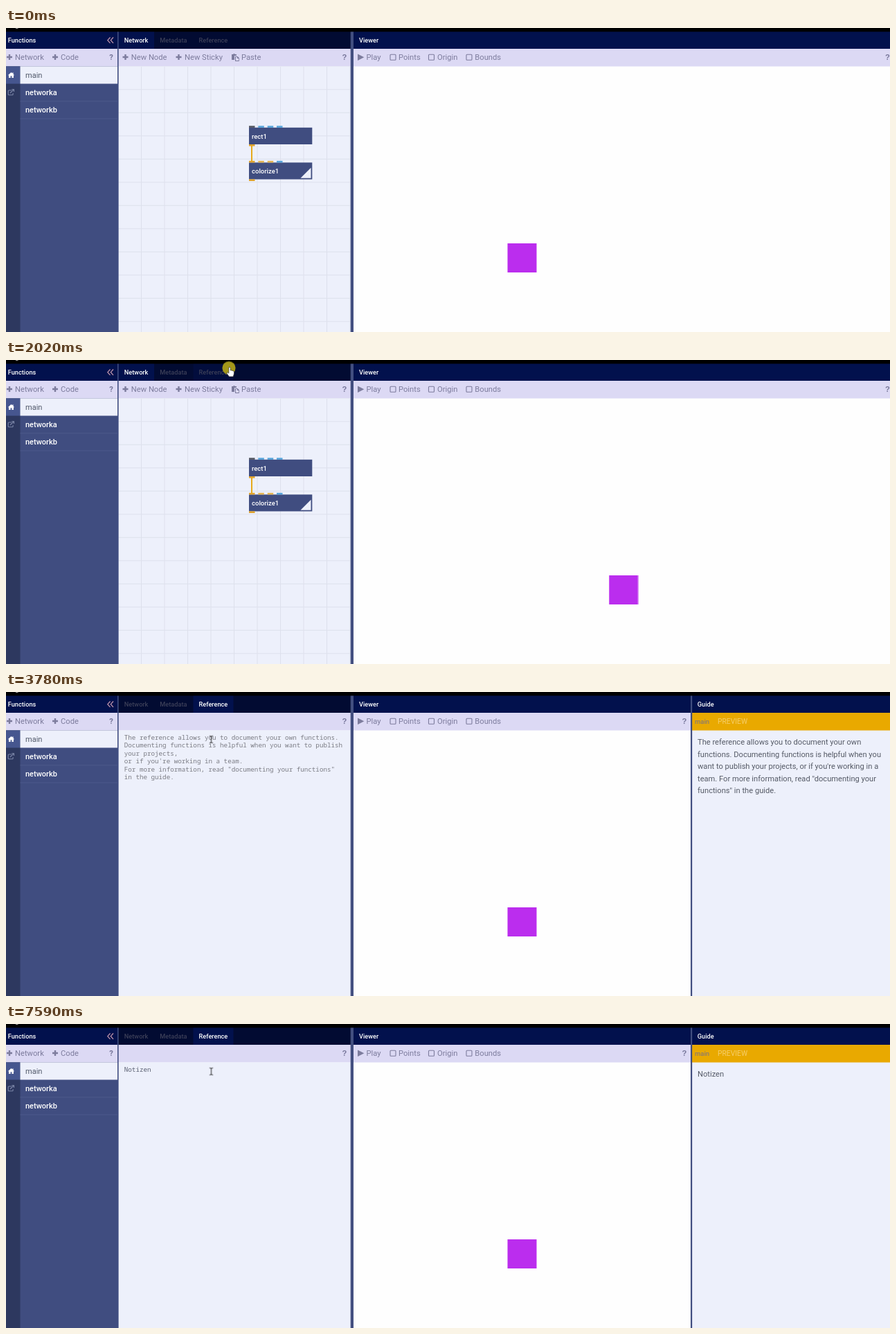
Recreate the animation shown at these times as an HTML page. Size 1277 by 439 pixels, loop 8 s.

```html
<!DOCTYPE html>
<html lang="en">
<head>
<meta charset="utf-8">
<title>Node editor</title>
<style>
  html, body { margin: 0; width: 100%; height: 100%; overflow: hidden; background: #fefefe; }
  svg { display: block; width: 100%; height: 100%; }
  text { white-space: pre; font-family: Roboto, "Noto Sans", sans-serif; }

  .title { font-size: 9.2px; font-weight: 500; fill: #fff; }
  .dim { fill: #3c3f58; }
  .tool { font: 11.2px "Liberation Sans", Arial, sans-serif; fill: #7d7c9d; }
  .help { font-weight: 700; fill: #77769a; text-anchor: middle; }
  .item { font-size: 11px; font-weight: 500; fill: #fff; }
  .node { font-size: 9.5px; font-weight: 500; fill: #fff; }
  .mono { font: 9.22px "Noto Sans Mono", "DejaVu Sans Mono", monospace; fill: #7b7c84; }
  .typed { fill: #5a6072; }
  .prose { font-size: 11.13px; fill: #555a66; }
  .icon { fill: #7d7c9d; }
  .box { fill: none; stroke: #7d7c9d; stroke-width: 1.1; }
  .bar { fill: #02114d; }
  .tools { fill: #dcd9f4; }
  .paper { fill: #edf0fb; }
  .slate { fill: #404d80; }
  .gold { fill: #e0a32c; }
  .tan { fill: #e4b552; }
  .blue { fill: #55a3da; }

  .net, .ref, .hint, .hover, .square, .click, .mouse, .arrow, .hand, .beam {
    animation: 8s step-end infinite;
  }
  .net { animation-name: net; }
  .ref { animation-name: ref; }
  .hint { animation-name: hint; }
  .hover { animation-name: hover; }
  .square { animation-name: square; }
  .click { animation-name: click; }
  .mouse { animation-name: mouse; }
  .arrow { animation-name: arrow; }
  .hand { animation-name: hand; }
  .beam { animation-name: beam; }

  @keyframes net { 0% { opacity: 1 } 26.25%, 100% { opacity: 0 } }
  @keyframes ref { 0% { opacity: 0 } 26.25%, 100% { opacity: 1 } }
  @keyframes hint { 0% { opacity: 1 } 53.25%, 100% { opacity: 0 } }
  @keyframes hover { 0% { opacity: 0 } 21.375%, 100% { opacity: 1 } }
  @keyframes square {
    0% { transform: none }
    25.25% { transform: translateX(146.5px) }
    40.625%, 100% { transform: none }
  }
  @keyframes click {
    0% { opacity: 0; transform: translate(322px, 11.5px) }
    24.125% { opacity: 1; transform: translate(322px, 11.5px) }
    26.25% { opacity: 0; transform: translate(296.5px, 68px) }
    39.625% { opacity: 1; transform: translate(296.5px, 68px) }
    41.5%, 100% { opacity: 0; transform: translate(296.5px, 68px) }
  }
  @keyframes mouse {
    0% { transform: translate(467px, 390px) }
    13.5% { transform: translate(457px, 334px) }
    14.5% { transform: translate(432px, 246px) }
    15.5% { transform: translate(402px, 150px) }
    16.375% { transform: translate(373px, 78px) }
    17.375% { transform: translate(352px, 34px) }
    18.375% { transform: translate(343px, 17px) }
    19.375% { transform: translate(338px, 14px) }
    20.375% { transform: translate(333px, 12px) }
    21.375% { transform: translate(326px, 11px) }
    22.25% { transform: translate(323px, 10px) }
    30% { transform: translate(311px, 38px) }
    31% { transform: translate(298px, 70px) }
    32% { transform: translate(293.5px, 85.5px) }
    35.875% { transform: translate(294px, 82px) }
    36.75% { transform: translate(295px, 77px) }
    37.75% { transform: translate(296px, 72px) }
    38.75%, 100% { transform: translate(296.5px, 68.5px) }
  }
  @keyframes arrow {
    0% { opacity: 0 } 12.5% { opacity: 1 } 21.375% { opacity: 0 }
    30% { opacity: 1 } 31%, 100% { opacity: 0 }
  }
  @keyframes hand { 0% { opacity: 0 } 21.375% { opacity: 1 } 30%, 100% { opacity: 0 } }
  @keyframes beam { 0% { opacity: 0 } 31%, 100% { opacity: 1 } }
</style>
</head>
<body>
<svg viewBox="0 0 1277 439" xmlns="http://www.w3.org/2000/svg">
  <defs>
    <path id="plus" d="M-4-1.2h2.8V-4h2.4v2.8H4v2.4H1.2V4h-2.4V1.2H-4z"/>
    <rect id="check" x="-4" y="-4" width="8" height="8" rx="1"/>
    <rect id="port" width="8.5" height="2.6"/>
    <pattern id="grid" x="195" y="88.3" width="33.5" height="33.5" patternUnits="userSpaceOnUse">
      <path d="M.5 0V33.5M0 .5H33.5" stroke="#dde0ec" fill="none"/>
    </pattern>
  </defs>

  <!-- Viewer -->
  <rect x="500" y="55" width="777" height="384" fill="#fefefe"/>
  <rect class="square" x="724.5" y="311" width="42" height="42" fill="#bb2dee"/>
  <rect class="bar" y="5" width="1277" height="25"/>
  <rect class="tools" y="30" width="1277" height="25.5"/>
  <text class="title" x="510" y="20.8">Viewer</text>
  <path class="icon" d="M508 37.5l9.3 4.7-9.3 4.7z"/>
  <g class="box">
    <use href="#check" x="559" y="42.2"/>
    <use href="#check" x="614.5" y="42.2"/>
    <use href="#check" x="669" y="42.2"/>
  </g>
  <g class="tool">
    <text x="520.5" y="46.3">Play</text>
    <text x="567" y="46.3">Points</text>
    <text x="623" y="46.3">Origin</text>
    <text x="677.3" y="46.3">Bounds</text>
  </g>

  <!-- Middle panel -->
  <rect class="paper" x="162" y="55.5" width="336" height="384"/>
  <rect x="162" y="5" width="336" height="25" fill="#020b32"/>
  <g class="net">
    <rect x="162" y="55.5" width="336" height="384" fill="url(#grid)"/>
    <rect class="bar" x="162" y="5" width="52" height="25"/>
    <g class="hover">
      <rect x="270.5" y="5" width="58" height="25" fill="#020d3d"/>
    </g>
    <text class="title" x="170.8" y="20.8">Network</text>
    <text class="title dim" x="222.3" y="20.8">Metadata</text>
    <text class="title dim" x="278.6" y="20.8">Reference</text>
    <g class="icon">
      <use href="#plus" x="172.5" y="42"/>
      <use href="#plus" x="249.5" y="42"/>
      <path d="M326 38h2q1.5-2 3 0h2v2h-3v6h-4zM331 41h3.5l2.3 2.3V48H331z"/>
    </g>
    <path d="M332 42h2v2h2v3h-4z" fill="#dcd9f4"/>
    <g class="tool">
      <text x="180.8" y="46.3">New Node</text>
      <text x="258" y="46.3">New Sticky</text>
      <text x="340" y="46.3">Paste</text>
    </g>

    <path d="M355 170V193" stroke="#e6a91b" stroke-width="2"/>
    <rect class="slate" x="351" y="143.8" width="91.3" height="24.2"/>
    <rect class="slate" x="351" y="194.3" width="91.3" height="24.2"/>
    <path d="M425.5 216.7H440.5V201.7z" fill="#eef1fb"/>
    <use href="#port" x="351" y="141.3" fill="#51545f"/>
    <g class="blue">
      <use href="#port" x="364.3" y="141.3"/>
      <use href="#port" x="377.7" y="141.3"/>
      <use href="#port" x="391" y="141.3"/>
      <use href="#port" x="391" y="191.8"/>
    </g>
    <g class="gold">
      <use href="#port" x="351" y="168"/>
      <use href="#port" x="351" y="191.8"/>
      <use href="#port" x="351" y="218.4"/>
    </g>
    <g class="tan">
      <use href="#port" x="364.3" y="191.8"/>
      <use href="#port" x="377.7" y="191.8"/>
    </g>
    <text class="node" x="355" y="159.8">rect1</text>
    <text class="node" x="355" y="210.2">colorize1</text>
    <text class="tool help" x="1273.5" y="46.3">?</text>
  </g>

  <!-- Reference and guide -->
  <g class="ref">
    <rect class="bar" x="270.5" y="5" width="58" height="25"/>
    <text class="title dim" x="170.8" y="20.8">Network</text>
    <text class="title dim" x="222.3" y="20.8">Metadata</text>
    <text class="title" x="278.6" y="20.8">Reference</text>
    <text class="tool help" x="980" y="46.3">?</text>
    <rect class="paper" x="990" y="55.5" width="287" height="384"/>
    <rect x="990" y="30" width="287" height="25.5" fill="#e9a900"/>
    <rect class="slate" x="989" y="5" width="2.2" height="434"/>
    <text class="title" x="998.8" y="20.8">Guide</text>
    <text class="title" x="995" y="45.6" style="fill:#8a7b72;font-size:9.5px">main</text>
    <text x="1028" y="46" font-size="10.3" fill="#f6cf6c">PREVIEW</text>
    <g class="hint">
      <text class="mono">
        <tspan x="170.8" y="69">The reference allows you to document your own functions.</tspan>
        <tspan x="170.8" y="80.4">Documenting functions is helpful when you want to publish</tspan>
        <tspan x="170.8" y="91.8">your projects,</tspan>
        <tspan x="170.8" y="103.2">or if you're working in a team.</tspan>
        <tspan x="170.8" y="114.6">For more information, read "documenting your functions"</tspan>
        <tspan x="170.8" y="126">in the guide.</tspan>
      </text>
      <text class="prose">
        <tspan x="999" y="76">The reference allows you to document your own</tspan>
        <tspan x="999" y="93.5">functions. Documenting functions is helpful when you</tspan>
        <tspan x="999" y="111">want to publish your projects, or if you're working in a</tspan>
        <tspan x="999" y="128.5">team. For more information, read "documenting your</tspan>
        <tspan x="999" y="146">functions" in the guide.</tspan>
      </text>
    </g>
    <text id="note" class="mono typed" x="170.8" y="69"></text>
    <text id="preview" class="prose" x="999" y="76"></text>
    <rect id="caret" width="1" height="11.5" fill="#3b4050"/>
  </g>
  <text class="tool help" x="489" y="46.3">?</text>

  <!-- Sidebar -->
  <rect class="slate" y="55.5" width="162" height="384"/>
  <rect y="55.5" width="20.5" height="384" fill="#2d385f"/>
  <rect y="55.5" width="20.5" height="25" fill="#46568f"/>
  <rect class="paper" x="20.5" y="55.5" width="141" height="25"/>
  <path d="M20.5 105.8H161M20.5 131H161" stroke="#4c598b"/>
  <rect class="slate" x="161" y="5" width="1.6" height="434"/>
  <rect x="497.7" y="5" width="4.3" height="434" fill="#434f80"/>
  <text class="title" x="2.8" y="20.8">Functions</text>
  <path d="M150.5 13.5l-3.7 4.2 3.7 4.2M155 13.5l-3.7 4.2 3.7 4.2" fill="none" stroke="#c59aae" stroke-width="1.2"/>
  <g class="icon">
    <use href="#plus" x="5" y="42"/>
    <use href="#plus" x="71" y="42"/>
  </g>
  <g class="tool">
    <text x="13" y="46.3">Network</text>
    <text x="79" y="46.3">Code</text>
    <text class="help" x="152" y="46.3">?</text>
  </g>
  <path d="M2.8 68.3L7.5 64l1.8 1.6V64.4h1.3v2.4l1.6 1.5h-1.3V72H8.4V69.3H6.6V72H4V68.3z" fill="#fff"/>
  <path d="M8 90H4.2q-1 0-1 1v4.8q0 1 1 1h4.9q1 0 1-1V94M6 94l5-5M8.3 88.8H11.5V92" fill="none" stroke="#7c86a8" stroke-width="1.1"/>
  <text class="item" x="28" y="72" style="fill:#505869;font-weight:400">main</text>
  <text class="item" x="28" y="96.8">networka</text>
  <text class="item" x="28" y="122">networkb</text>

  <rect width="1277" height="5.4" fill="#000"/>
  <rect x="14" width="3.5" height="1" fill="#999"/>

  <!-- Pointer -->
  <circle class="click" r="9.6" fill="#a4971a"/>
  <g class="mouse">
    <path class="arrow" d="M0 0V10.2L2.3 8.1 3.9 11.6 5.6 10.8 4.1 7.4H7.2z" fill="#fff" stroke="#111" stroke-width=".6"/>
    <path class="hand" d="M-1.2 1Q0-.6 1.2 1V5Q2.4 4.2 3.2 5.4 4.6 4.7 5.2 6 6.4 5.8 6.4 7.4V10L5.2 14H-.8L-3.8 9.4Q-4.4 7.6-2.8 7.8L-1.2 9.2z" fill="#fff" stroke="#222" stroke-width=".6"/>
    <path class="beam" d="M-2.5-5Q0-5.2 0-4 0-5.2 2.5-5M0-4.5V4.5M-2.5 5Q0 5.2 0 4 0 5.2 2.5 5" fill="none" stroke="#222" stroke-width="1"/>
  </g>
</svg>
<script>
  const LOOP = 8000, WORD = "Notizen", LEFT = 171, TOP = 60, LINE = 11.5;
  // time, letters typed, caret line, caret shown
  const steps = [
    [0, 0, 0, 0], [3250, 0, 0, 1], [3780, 0, 0, 0],
    [4260, 1, 0, 1], [4480, 2, 0, 1], [5030, 2, 0, 0],
    [5110, 3, 0, 1], [5660, 3, 0, 0], [5810, 4, 0, 1],
    [6050, 5, 0, 1], [6220, 6, 0, 1], [6300, 7, 0, 1],
    [6820, 7, 0, 0], [6900, 7, 1, 1], [7070, 7, 2, 1], [7590, 7, 2, 0]
  ];
  const [note, preview, caret] = ["note", "preview", "caret"].map(id => document.getElementById(id));
  let start, shown;

  function show(step) {
    const [, count, line, on] = step;
    note.textContent = preview.textContent = WORD.slice(0, count);
    const width = count && !line ? note.getComputedTextLength() : 0;
    caret.setAttribute("x", LEFT + Math.floor(width));
    caret.setAttribute("y", TOP + line * LINE);
    caret.setAttribute("opacity", on);
  }

  function tick(now) {
    start ??= now;
    const t = (now - start) % LOOP;
    const step = steps.findLast(s => s[0] <= t) || steps[0];
    if (step !== shown) show(shown = step);
    requestAnimationFrame(tick);
  }
  requestAnimationFrame(tick);
</script>
</body>
</html>
```
